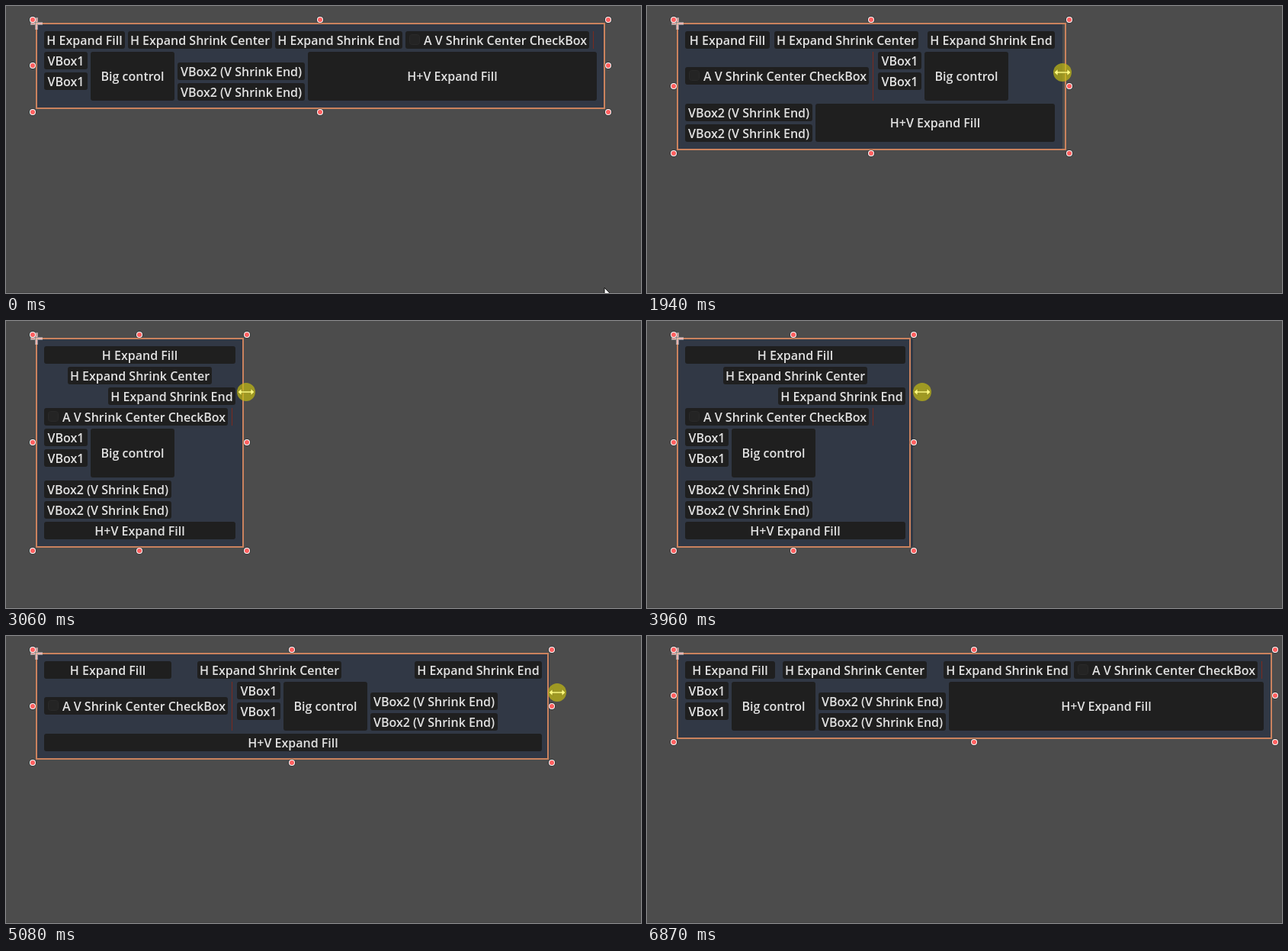
An HTML page that plays this animation: 833x376 px, repeating every 7790 ms.

```html
<!DOCTYPE html>
<html lang="en">
<head>
<meta charset="utf-8">
<title>Flow container resize</title>
<style>
  html, body { margin: 0; width: 100%; height: 100%; overflow: hidden; background: #4c4c4c; }
  svg { display: block; width: 833px; height: 376px; }
  text { font: 600 16px "Open Sans", "Noto Sans", sans-serif; fill: #e2e2e2; }
  .box { fill: #1f1f1f; }
</style>
</head>
<body>
<svg id="stage" viewBox="0 0 833 376" xmlns="http://www.w3.org/2000/svg">
  <rect width="833" height="376" fill="#4c4c4c"/>
  <rect y="375" width="833" height="1" fill="#454545"/>
  <rect id="panel" x="40" y="23" rx="3" fill="#313845"/>
  <g id="items"></g>
  <rect id="outline" x="40" y="23" fill="none" stroke="#ca825e" stroke-width="2"/>
  <g fill="none">
    <path d="M32 23H48M40 15V31" stroke="#fff" stroke-opacity=".41" stroke-width="4"/>
    <path d="M33 23H38M42 23H47M40 16V21M40 25V30" stroke="#f0b4b0" stroke-width="2"/>
  </g>
  <g id="handles"></g>
  <path id="arrow" d="M0 0V16.5L3.8 13L6.3 18.8L8.9 17.7L6.4 12H11.7Z" fill="#fff" stroke="#111"/>
  <g id="grip">
    <circle r="12" fill="#c3bb12" fill-opacity=".7"/>
    <path d="M-11 0L-6 -4.5V-1.2H6V-4.5L11 0L6 4.5V1.2H-6V4.5Z" fill="#fbf77c" stroke="#858018" stroke-width=".7"/>
  </g>
</svg>
<script>
const LOOP = 7790, ENTER_END = 420, DRAG_START = 750, RELEASE = 6450, EXIT_START = 6380, GONE = 6870;
const X0 = 40, Y0 = 23, PAD = 10, GAP = 4, LINE = 23;
const $ = id => document.getElementById(id);

function set(el, attrs) {
  for (const k in attrs) el.setAttribute(k, attrs[k]);
  return el;
}
function make(tag, parent, attrs) {
  const el = document.createElementNS("http://www.w3.org/2000/svg", tag);
  parent.appendChild(el);
  return set(el, attrs);
}

// Turning points of the drag: time, right edge of the panel, pointer height
const drag = [
  [DRAG_START, 785, 72], [1310, 750, 77], [1520, 692, 80], [2430, 401, 93], [3300, 300, 93],
  [3870, 315, 93], [3960, 349, 93], [4520, 573, 77], [5640, 803, 73], [5920, 819, 73]
];

// Monotone cubic through one column of the drag points
function curve(col, t) {
  const last = drag.length - 1;
  if (t <= drag[0][0]) return drag[0][col];
  if (t >= drag[last][0]) return drag[last][col];
  let i = 0;
  while (t >= drag[i + 1][0]) i++;
  const rise = j => j < 0 || j >= last ? 0
    : (drag[j + 1][col] - drag[j][col]) / (drag[j + 1][0] - drag[j][0]);
  const slope = j => {
    const a = rise(j - 1), b = rise(j);
    return a * b > 0 ? 2 * a * b / (a + b) : 0;
  };
  const d = drag[i + 1][0] - drag[i][0], u = (t - drag[i][0]) / d, v = 1 - u;
  return drag[i][col] * v * v * (1 + 2 * u) + drag[i + 1][col] * u * u * (3 - 2 * u)
    + d * u * v * (slope(i) * v - slope(i + 1) * u);
}

// The pointer runs ahead of the panel, the outline trails behind it
function pose(t) {
  const right = curve(1, t);
  const speed = (curve(1, t + 1) - curve(1, t - 1)) / 2;
  return {
    right: Math.round(right),
    edge: Math.round(right) - Math.trunc(11 * speed),
    pointer: pointerAt(t, right + 6 + 15 * speed)
  };
}
function pointerAt(t, x) {
  if (t < DRAG_START) {
    const u = Math.min(t / ENTER_END, 1), bend = Math.sin(Math.PI * u);
    return [785 + 6 * u + 10 * bend, 72 + 297 * (1 - u) ** 2 - 25 * bend];
  }
  if (t > EXIT_START) {
    const u = (t - EXIT_START) / (GONE - EXIT_START);
    return [x - 18 * u, 73 + 312 * u * u];
  }
  return [x, curve(2, t)];
}

const items = [
  { text: "H Expand Fill", w: 106, h: LINE, grow: true, fill: true },
  { text: "H Expand Shrink Center", w: 189, h: LINE, grow: true, align: 0.5 },
  { text: "H Expand Shrink End", w: 167, h: LINE, grow: true, align: 1 },
  { text: "A V Shrink Center CheckBox", w: 241, h: LINE, check: true, valign: 0.5 },
  { w: 4, h: 4, line: true },
  { text: "VBox1", w: 57, h: 50, rows: 2, valign: 0 },
  { text: "Big control", w: 110, h: 64 },
  { text: "VBox2 (V Shrink End)", w: 167, h: 50, rows: 2, valign: 1 },
  { text: "H+V Expand Fill", w: 125, h: LINE, grow: true, fill: true }
];

for (const it of items) {
  const g = make("g", $("items"), {});
  if (it.line) {
    it.rule = make("rect", g, { width: 1, fill: "#7a2a1e" });
    continue;
  }
  it.labels = [];
  for (let i = 0; i < (it.rows || 1); i++) {
    const box = make("rect", g, { class: "box", rx: 3 });
    if (it.check)
      it.tick = make("rect", g, { width: 13, height: 13, rx: 3, fill: "#242424", stroke: "#2a2a2a" });
    const label = make("text", g, { "text-anchor": it.check ? "start" : "middle" });
    label.textContent = it.text;
    it.labels.push({ box, label });
  }
}

const handles = Array.from({ length: 8 }, () => {
  const g = make("g", $("handles"), {});
  make("circle", g, { r: 5, fill: "#000", "fill-opacity": 0.29 });
  make("circle", g, { r: 4, fill: "#fefefe" });
  make("circle", g, { r: 3, fill: "#ff5f5f" });
  return g;
});

function place(it, x, y, w, h) {
  if (it.line) return set(it.rule, { x: x + 1, y, height: h });
  const rowH = it.rows ? LINE : h;
  it.labels.forEach(({ box, label }, i) => {
    const top = y + i * (LINE + GAP);
    set(box, { x, y: top, width: w, height: rowH });
    set(label, {
      x: it.check ? x + 24 : x + w / 2,
      y: top + Math.floor((rowH - LINE) / 2) + 18
    });
  });
  if (it.check) set(it.tick, { x: x + 5.5, y: y + 4.5 });
}

// Wraps the items into rows and returns the bottom of the last row
function flow(width) {
  const rows = [];
  let used = Infinity;
  for (const it of items) {
    if (used + GAP + it.w > width) {
      rows.push([]);
      used = -GAP;
    }
    rows[rows.length - 1].push(it);
    used += GAP + it.w;
  }
  let y = Y0 + PAD;
  for (const row of rows) {
    const h = Math.max(...row.map(it => it.h));
    const need = row.reduce((sum, it) => sum + it.w + GAP, -GAP);
    const growers = row.filter(it => it.grow).length;
    const extra = growers ? Math.floor((width - need) / growers) : 0;
    let x = X0 + PAD;
    for (const it of row) {
      const slot = it.w + (it.grow ? extra : 0);
      const w = it.fill ? slot : it.w;
      const ih = it.valign === undefined ? h : it.h;
      place(it, x + Math.floor((slot - w) * (it.align || 0)),
        y + Math.floor((h - ih) * (it.valign || 0)), w, ih);
      x += slot + GAP;
    }
    y += h + GAP;
  }
  return y - GAP;
}

// Holds each picture for one 70 ms beat; the beat drifts slightly over the loop
function beat(t) {
  const shift = t < 700 ? 0 : t < 3600 ? 50 : t < 5950 ? 40 : 10;
  return shift + 70 * Math.floor((t - shift) / 70);
}

function draw(time) {
  const t = beat(time);
  const { right, edge, pointer } = pose(t);
  const bottom = flow(right - X0 - 2 * PAD) + PAD;

  set($("panel"), { width: right - X0, height: bottom - Y0 });
  set($("outline"), { width: edge - X0, height: bottom - Y0 });
  const xs = [X0 - 5, Math.floor((X0 + edge) / 2), edge + 5];
  const ys = [Y0 - 5, Math.floor((Y0 + bottom) / 2), bottom + 5];
  let n = 0;
  ys.forEach((y, j) => xs.forEach((x, i) => {
    if (i !== 1 || j !== 1) set(handles[n++], { transform: `translate(${x} ${y})` });
  }));

  const held = t >= DRAG_START && t < RELEASE;
  const at = `translate(${pointer.map(Math.round).join(" ")})`;
  set($("grip"), { transform: at, visibility: held ? "visible" : "hidden" });
  set($("arrow"), { transform: at, visibility: held || t >= GONE ? "hidden" : "visible" });
}

const start = performance.now();
function tick() {
  draw((performance.now() - start) % LOOP);
  requestAnimationFrame(tick);
}
tick();
</script>
</body>
</html>
```
